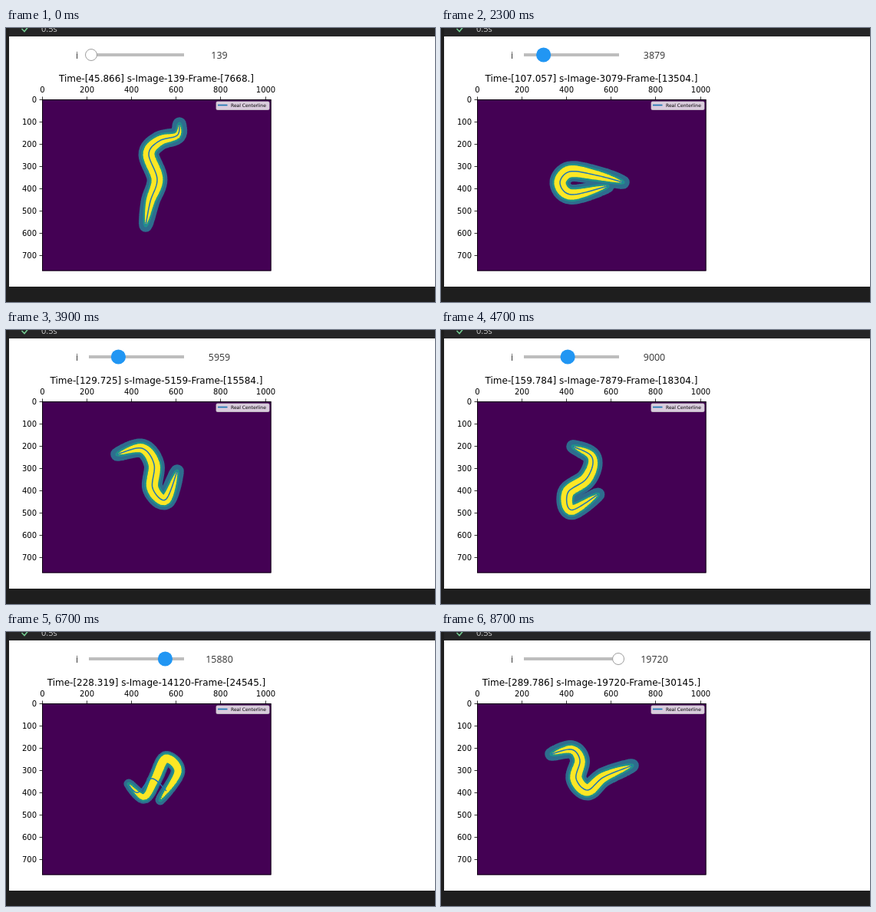
An HTML page with a canvas that plays this animation: 559x357 px, repeating every 8800 ms.

```html
<!DOCTYPE html>
<html lang="en">
<head>
<meta charset="utf-8">
<title>Worm centerline viewer</title>
<style>
html, body { margin: 0; width: 100%; height: 100%; overflow: hidden; background: #fff; }
canvas { display: block; }
</style>
</head>
<body>
<canvas id="stage" width="559" height="357"></canvas>
<script>
const ctx = document.getElementById('stage').getContext('2d');
const LOOP = 8800, STEP = 100, PLOT_LAG = 300;
const SEGMENTS = 60, TURN = 2 * Math.PI;
const BLUE = '#1f77b4';
const AXES = { x: 47, y: 93, w: 298.5, h: 223.5, scale: 0.2905 };

// Slider drag as [time, position]; the plot follows it after PLOT_LAG.
const drag = [[700, 0], [1000, 4], [1300, 12], [2000, 18], [2300, 23], [3600, 31], [3900, 36],
  [5100, 65], [5400, 69], [6400, 87], [6700, 98], [7800, 118], [8000, 118], [8100, 122]];

// Key poses by slider position: a few points along the body, from nose to tail.
const poses = [
  { at: 0, clock: 45.866, body: '182,257 188,226 197,197 186,164 200,147 223,140 226,125' },
  { at: 4, clock: 82.793, body: '175,222 203,195 227,212 232,248 255,263 265,242' },
  { at: 18, clock: 107.057, body: '237,201 203,192 168,187 155,202 170,217 217,206' },
  { at: 31, clock: 129.725, body: '145,162 177,154 193,175 191,206 208,221 223,184' },
  { at: 65, clock: 189.844, body: '201,178 209,203 182,213 152,206 142,227 182,232' },
  { at: 87, clock: 228.319, body: '160,198 180,215 194,192 208,165 224,182 201,219',
    line: '160,200 172,209 190,191 209,207', girth: 5.5 },
  { at: 122, clock: 289.786, body: '144,159 170,153 181,167 176,191 191,206 212,189 249,174' }
].map(pose => ({ girth: 7.8, line: pose.body, ...pose }));

const mix = (a, b, u) => a + (b - a) * u;
const mean = list => list.reduce((a, b) => a + b, 0) / list.length;
const nearestTurn = (angle, reference) => angle + TURN * Math.round((reference - angle) / TURN);

function sample(track, at) {
  if (at <= track[0][0]) return track[0][1];
  for (let i = 1; i < track.length; i++) {
    const [x0, y0] = track[i - 1], [x1, y1] = track[i];
    if (at <= x1) return mix(y0, y1, (at - x0) / (x1 - x0));
  }
  return track[track.length - 1][1];
}

// Catmull-Rom curve resampled to points at equal distances.
function curve(text) {
  const keys = text.split(' ').map(pair => pair.split(',').map(Number));
  const dense = [];
  for (let i = 0; i < keys.length - 1; i++) {
    const span = [keys[i - 1] || keys[i], keys[i], keys[i + 1], keys[i + 2] || keys[i + 1]];
    for (let u = 0; u < 1; u += 1 / 32) {
      dense.push([0, 1].map(d => {
        const [a, b, c, e] = span.map(p => p[d]);
        return b + u / 2 * (c - a + u * (2 * a - 5 * b + 4 * c - e + u * (3 * (b - c) + e - a)));
      }));
    }
  }
  dense.push(keys[keys.length - 1]);
  let total = 0;
  const dist = dense.map(([x, y], i) => {
    if (i) total += Math.hypot(x - dense[i - 1][0], y - dense[i - 1][1]);
    return total;
  });
  const [xs, ys] = [0, 1].map(d => dense.map((p, i) => [dist[i], p[d]]));
  return Array.from({ length: SEGMENTS + 1 }, (_, i) =>
    [xs, ys].map(track => sample(track, total * i / SEGMENTS)));
}

// A curve as centre, segment length and headings, so that bending keeps its length.
function bend(text, previous) {
  const pts = curve(text), angles = [];
  let length = 0;
  for (let i = 1; i < pts.length; i++) {
    const dx = pts[i][0] - pts[i - 1][0], dy = pts[i][1] - pts[i - 1][1];
    const angle = Math.atan2(dy, dx);
    angles.push(i > 1 ? nearestTurn(angle, angles[i - 2]) : angle);
    length += Math.hypot(dx, dy);
  }
  const middle = mean(angles);
  const shift = previous ? nearestTurn(middle, mean(previous.angles)) - middle : 0;
  return {
    centre: [0, 1].map(d => mean(pts.map(p => p[d]))),
    segment: length / SEGMENTS,
    angles: angles.map(a => a + shift)
  };
}

poses.forEach((pose, i) => {
  for (const part of ['body', 'line'])
    pose[part] = bend(pose[part], i ? poses[i - 1][part] : null);
});

function blend(a, b, u) {
  const segment = mix(a.segment, b.segment, u);
  const pts = [[0, 0]];
  a.angles.forEach((angle, i) => {
    const heading = mix(angle, b.angles[i], u), [x, y] = pts[i];
    pts.push([x + segment * Math.cos(heading), y + segment * Math.sin(heading)]);
  });
  const [ox, oy] = [0, 1].map(d => mix(a.centre[d], b.centre[d], u) - mean(pts.map(p => p[d])));
  return pts.map(([x, y]) => [x + ox, y + oy]);
}

function poseAt(position) {
  const i = Math.max(1, poses.findIndex(p => p.at >= position));
  const a = poses[i - 1], b = poses[i];
  const u = (position - a.at) / (b.at - a.at);
  return {
    clock: mix(a.clock, b.clock, u),
    girth: mix(a.girth, b.girth, u),
    body: blend(a.body, b.body, u),
    line: blend(a.line, b.line, u)
  };
}

function rect(color, x, y, w, h) {
  ctx.fillStyle = color;
  ctx.fillRect(x, y, w, h);
}

function label(text, x, y, font, align = 'center', color = '#000') {
  ctx.font = font;
  ctx.textAlign = align;
  ctx.fillStyle = color;
  ctx.fillText(text, x, y);
}

function polyline(pts, color, width) {
  ctx.beginPath();
  pts.forEach(([x, y]) => ctx.lineTo(x, y));
  ctx.strokeStyle = color;
  ctx.lineWidth = width;
  ctx.stroke();
}

function drawWorm({ body, line, girth }) {
  const layer = (color, margin, share) => {
    ctx.fillStyle = color;
    ctx.beginPath();
    body.forEach(([x, y], i) => {
      const taper = Math.max(0, Math.sin(Math.PI * i / SEGMENTS)) ** 0.6;
      const r = margin + share * girth * taper;
      ctx.moveTo(x + r, y);
      ctx.arc(x, y, r, 0, TURN);
    });
    ctx.fill();
  };
  layer('#2e6d8e', girth + 1, 0.62);
  layer('#21908c', 2.5, 1);
  layer('#fde725', 0, 1);
  polyline(line, BLUE, 1.5);
}

function drawPlot(pose) {
  const { x, y, w, h, scale } = AXES, small = '10px "DejaVu Sans", sans-serif';
  rect('#440154', x, y, w, h);
  drawWorm(pose);
  ctx.strokeStyle = '#000';
  ctx.lineWidth = 0.8;
  ctx.strokeRect(x + 0.4, y + 0.4, w - 0.8, h - 0.8);
  for (let v = 0; v <= 1000; v += 200) {
    const tx = Math.round(x + v * scale) + 0.5;
    polyline([[tx, y], [tx, y - 3.5]], '#000', 0.8);
    label(v, tx, 84, small);
  }
  for (let v = 0; v <= 700; v += 100) {
    const ty = Math.round(y + v * scale) + 0.5;
    polyline([[x, ty], [x - 3.5, ty]], '#000', 0.8);
    label(v, 40, ty + 3.5, small, 'right');
  }
  ctx.fillStyle = 'rgba(255,255,255,.8)';
  ctx.strokeStyle = '#ccc';
  ctx.beginPath();
  ctx.roundRect(274, 96, 69, 10.5, 1.5);
  ctx.fill();
  ctx.stroke();
  polyline([[276, 100.5], [288.5, 100.5]], BLUE, 1.7);
  label('Real Centerline', 293, 103, '6px "DejaVu Sans", sans-serif', 'left');
}

const valueAt = position => position ? Math.round(199.2 + 160.006 * position) : 139;

function drawSlider(time, position) {
  const font = '12.4px "Open Sans", sans-serif';
  label('i', 92.5, 40, font, 'center', '#333');
  label(valueAt(position), 278, 40, font, 'center', '#333');
  rect('#bdbdbd', 108, 33, 124, 4);
  const idle = time < 600 || time >= 8700;
  const dragging = time >= 800 && time < 8100;
  ctx.beginPath();
  ctx.arc(111 + 0.984 * position, 35, dragging ? 9.6 : idle ? 7.5 : 8, 0, TURN);
  ctx.fillStyle = idle ? '#fff' : '#2196f3';
  ctx.fill();
  if (idle) {
    ctx.strokeStyle = '#9e9e9e';
    ctx.lineWidth = 1;
    ctx.stroke();
  }
}

function drawWindow() {
  rect('#1e1e1e', 0, 0, 559, 357);
  rect('#252526', 4, 0, 555, 11);
  rect('#fff', 4, 11, 555, 326);
  polyline([[20.5, 1], [24, 4.5], [31, -4]], '#73c991', 1.6);
  label('0.5s', 46, 5, '11px "Open Sans", sans-serif', 'left', '#ccc');
}

function draw(time) {
  const shown = Math.round(sample(drag, time - PLOT_LAG));
  const pose = poseAt(shown);
  const index = valueAt(shown);
  const frame = index + (shown ? 10425 : 7529);
  drawWindow();
  drawSlider(time, Math.round(sample(drag, time)));
  label(`Time-[${pose.clock.toFixed(3)}] s-Image-${index}-Frame-[${frame}.]`, 196, 70,
    '12px "DejaVu Sans", sans-serif');
  drawPlot(pose);
}

function tick() {
  draw(Math.floor(performance.now() % LOOP / STEP) * STEP);
  requestAnimationFrame(tick);
}
tick();
</script>
</body>
</html>
```
